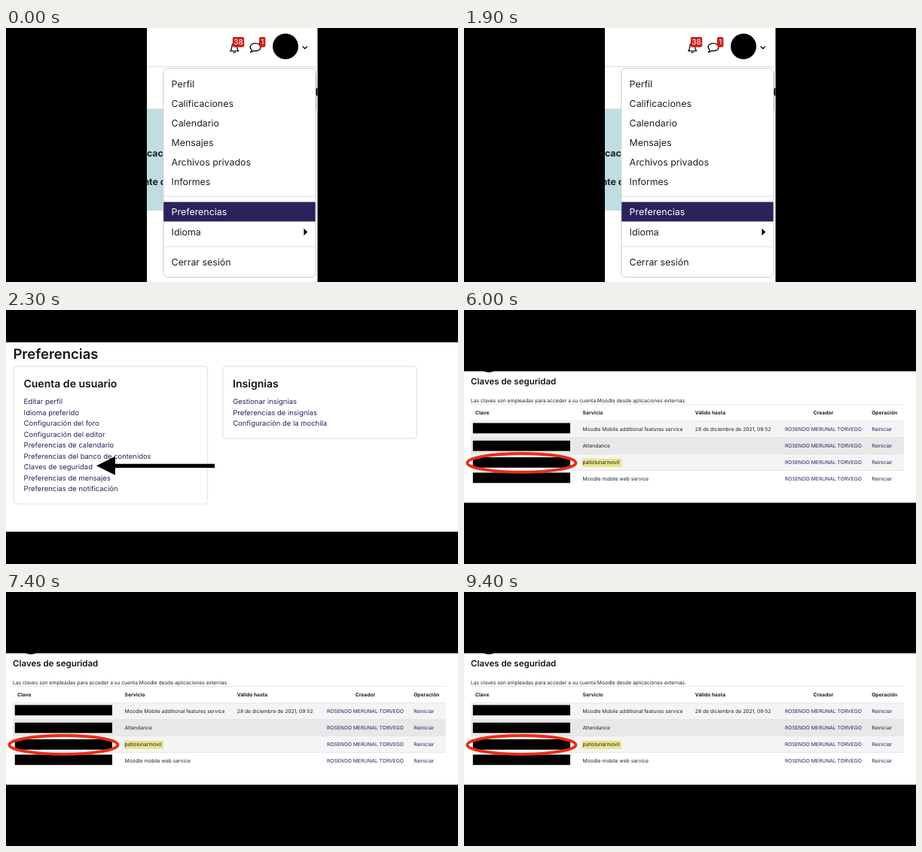
These frames come from a looping animation (600x338 px, 10 s). An HTML page:

```html
<!DOCTYPE html>
<html lang="es">
<head>
<meta charset="utf-8">
<title>Claves de seguridad</title>
<style>
  html, body { margin: 0; width: 100%; height: 100%; overflow: hidden; background: #000; }
  svg { display: block; width: 600px; height: 338px; font-family: Inter, "Noto Sans", sans-serif; text-rendering: geometricPrecision; }
  .scene { visibility: hidden; }
  .menu { font-size: 12.4px; fill: #1d2125; }
  .link { font-size: 9.46px; fill: #2a225d; }
  .cell { font-size: 6.72px; fill: #1d2125; }
  .name { fill: #2a225d; }
  .head { font-weight: 600; fill: #111418; }
  .bold { font-weight: 700; }
  .mid { text-anchor: middle; }
  .rule { stroke: #dcdee1; fill: none; }
  .icon { stroke: #111; stroke-width: 1.4; fill: none; stroke-linecap: round; stroke-linejoin: round; }
  .badge { font-size: 10px; fill: #fff; text-anchor: middle; }
</style>
</head>
<body>
<svg viewBox="0 0 600 338">
  <clipPath id="phone"><rect x="187" width="226.5" height="338"/></clipPath>

  <g class="scene" id="menu" clip-path="url(#phone)">
    <rect x="187" width="227" height="338" fill="#fff"/>
    <path class="rule" d="M187 51.5H414"/>
    <path class="icon" d="M297.8 30.6H308.6C306.8 28.8 306.8 27 306.6 24.5C306.3 19 300.1 19 299.8 24.5C299.6 27 299.6 28.8 297.8 30.6ZM302 32.6H304.4"/>
    <path class="icon" d="M324.4 32C326 31.2 326.4 30 326.2 29C321.8 25.6 325 20.4 331 20.4C335 20.4 338 22.6 338 25.4C338 29.2 333.2 31.3 328.8 30.2C327.6 31.3 326 32 324.4 32Z"/>
    <g fill="#ca2019">
      <rect x="300.8" y="12" width="15.4" height="13.4" rx="2"/>
      <rect x="336" y="12" width="8.4" height="13.4" rx="2"/>
    </g>
    <text class="badge" x="308.5" y="22.4">38</text>
    <text class="badge" x="340.2" y="22.4">1</text>
    <circle cx="371" cy="24.5" r="17"/>
    <path class="icon" d="M394 24.8L396.8 27.6L399.6 24.8"/>
    <rect x="187" y="107.5" width="30" height="135.5" fill="#c0dde1"/>
    <g class="menu bold">
      <text x="183.6" y="171">icac</text>
      <text x="182.4" y="209">nte d</text>
    </g>
    <rect x="411" y="60" width="3" height="50" fill="#d2d2d2"/>
    <circle cx="415" cy="85" r="5.5"/>
    <rect x="208.8" y="53.5" width="202.2" height="278" rx="6" fill="#fff" stroke="#c9cacc"/>
    <path class="rule" d="M209 224H411M209 291H411"/>
    <rect x="209.2" y="231.5" width="201.4" height="26" fill="#2a225d"/>
    <path d="M395.4 266.8V276.2L400.2 271.5Z"/>
  </g>

  <g class="scene" id="preferences">
    <rect y="43" width="600" height="252" fill="#fff"/>
    <rect class="rule" x="10.2" y="75" width="257.4" height="183" rx="4"/>
    <rect class="rule" x="287.8" y="75" width="257.6" height="96" rx="4"/>
    <g class="head">
      <text x="9.4" y="65" font-size="18.5">Preferencias</text>
      <text x="23.4" y="103" font-size="14.05">Cuenta de usuario</text>
      <text x="301" y="103" font-size="14.05">Insignias</text>
    </g>
  </g>

  <g class="scene" id="keys">
    <rect y="81.5" width="600" height="175" fill="#fff"/>
    <ellipse cx="33" cy="74" rx="12" ry="9"/>
    <text class="head" x="9" y="98.6" font-size="11.5">Claves de seguridad</text>
    <text class="cell" x="9" y="122.9">Las claves son empleadas para acceder a su cuenta Moodle desde aplicaciones externas.</text>
    <path class="rule" d="M9 125.6H584" stroke-width=".7"/>
  </g>
</svg>
<script>
const $ = id => document.getElementById(id);
const add = (id, markup) => $(id).insertAdjacentHTML('beforeend', markup);
const text = (cls, x, y, s) => `<text class="${cls}" x="${x}" y="${y}">${s}</text>`;
const rect = (x, y, w, h, fill) => `<rect x="${x}" y="${y}" width="${w}" height="${h}" fill="${fill}"/>`;
const list = (cls, x, y, step, items) => items.map((s, i) => text(cls, x, y + i * step, s)).join('');

add('menu',
  list('menu', 219.6, 78.8, 26, ['Perfil', 'Calificaciones', 'Calendario', 'Mensajes', 'Archivos privados', 'Informes']) +
  `<g style="--c:#fff"><text class="menu" style="fill:#fff" x="219.6" y="249.3">Preferencias</text></g>` +
  text('menu', 219.6, 275.6, 'Idioma') + text('menu', 219.6, 316.2, 'Cerrar sesión'));

add('preferences',
  list('link', 23.6, 125.2, 14.5, ['Editar perfil', 'Idioma preferido', 'Configuración del foro', 'Configuración del editor',
    'Preferencias de calendario', 'Preferencias del banco de contenidos', 'Claves de seguridad',
    'Preferencias de mensajes', 'Preferencias de notificación']) +
  list('link', 301.2, 125.2, 14.5, ['Gestionar insignias', 'Preferencias de insignias', 'Configuración de la mochila']) +
  '<path d="M120 207.3L145 194.8V204.7H277V209.9H145V219.8Z"/>');

const columns = [['Clave', 15], ['Servicio', 157.6], ['Válido hasta', 306.8], ['Creador', 477, 'mid'], ['Operación', 541.2]];
const services = [
  ['Moodle Mobile additional features service', '#f4f4f5', 150.4],
  ['Attendance', '#e8e8e8', 173.8],
  ['patiolunarmovil', '#f4f4f5', 196],
  ['Moodle mobile web service', '#fff', 216.4]
];
add('keys',
  columns.map(([s, x, align = '']) => text(`cell bold ${align}`, x, 139.2, s)).join('') +
  services.map(([service, fill, barY], i) => {
    const top = 147.8 + i * 21.9, base = 161.3 + i * 21.9;
    return rect(9, top, 575, 21.9, fill) + `<path class="rule" stroke-width=".7" d="M9 ${top}H584"/>` +
      rect(11.8, barY, 129.2, 13.8, '#000') +
      (i == 2 ? rect(156.8, 197.8, 52.4, 11, '#e8e48a') : '') +
      text('cell', 157.6, base, service) +
      text('cell name mid', 477, base, 'ROSENDO MERUNAL TORVEGO') +
      text('cell name', 541.2, base, 'Reiniciar');
  }).join('') +
  text('cell', 306.8, 161.3, '28 de diciembre de 2021, 09:52') +
  '<ellipse cx="76.4" cy="203.4" rx="72" ry="12.4" fill="none" stroke="#ee2b12" stroke-width="3.8"/>');

const starts = { menu: 0, preferences: 2000, keys: 6000 };
function draw() {
  const t = performance.now() % 10000;
  const current = Object.keys(starts).filter(id => t >= starts[id]).pop();
  for (const id in starts) $(id).style.visibility = id == current ? 'visible' : 'hidden';
  requestAnimationFrame(draw);
}
draw();
</script>
</body>
</html>
```
